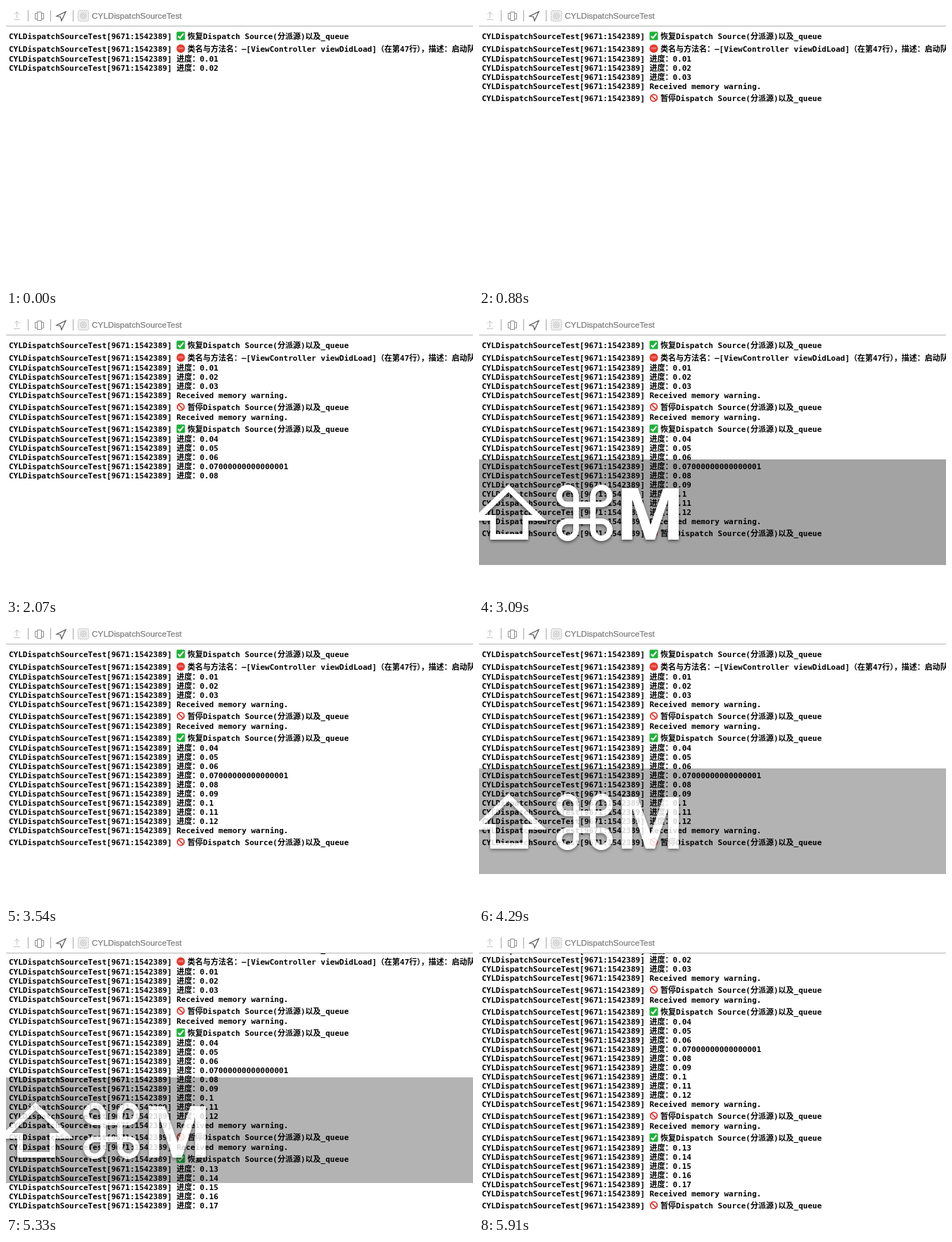
An HTML page for the animation above (7180 ms loop, 664x399 px).

```html
<!DOCTYPE html>
<html lang="zh-CN">
<head>
<meta charset="utf-8">
<style>
  html, body { margin: 0; width: 100%; height: 100%; overflow: hidden; background: #fff; }
  svg { display: block; }
  #log { font: bold 11px "DejaVu Sans Mono", "Noto Sans CJK SC", "Noto Sans CJK", monospace; }
  .title { font: 11.8px "Liberation Sans", sans-serif; fill: #7f7f7f; stroke: #7f7f7f; stroke-width: .25; }
  .keys { filter: drop-shadow(0 2px 2px rgba(0, 0, 0, .55)); }
</style>
</head>
<body>
<svg width="664" height="399" viewBox="0 0 664 399">
  <defs>
    <clipPath id="console"><rect y="29" width="664" height="370"/></clipPath>
    <g id="check">
      <rect x="-6" y="-6" width="12" height="12" rx="1.5" fill="#1fb13a"/>
      <path d="M-3.7 .4L-1.2 3L3.8-3.4" fill="none" stroke="#fff" stroke-width="2"/>
    </g>
    <g id="stop">
      <circle r="6" fill="#e5382d"/>
      <rect x="-4" y="-2" width="8" height="3" rx="1.5" fill="#fff" opacity=".3"/>
    </g>
    <g id="ban" fill="none" stroke="#dc3a30" stroke-width="1.8">
      <circle r="4.8"/>
      <path d="M-3.4-3.4L3.4 3.4"/>
    </g>
  </defs>

  <g clip-path="url(#console)"><g id="log"></g></g>

  <g fill="none">
    <path d="M0 28.5H664" stroke="#b4b4b4"/>
    <path d="M31.5 6V22M63.5 6V22M95.5 6V22" stroke="#a8a8a8"/>
    <path d="M15.5 17V8.5M12 12L15.5 8.5L19 12M11 19.5H20" stroke="#c4c4c4"/>
    <path d="M44.5 8.5H50.5V20.5H44.5ZM44 10.5H41.5V18.5H44M51 10.5H53.5V18.5H51" stroke="#8c8c8c"/>
    <path d="M85 8L72 14.5L77.5 15.5L79 21Z" stroke="#555" stroke-width="1.2"/>
    <rect x="102.5" y="6.5" width="15" height="15" rx="2" fill="#ececec" stroke="#c2c2c2" stroke-dasharray="2 1"/>
    <circle cx="110" cy="14" r="4" stroke="#c6c6c6"/>
    <circle cx="110" cy="14" r="1.5" stroke="#c6c6c6"/>
  </g>
  <text class="title" x="122" y="18">CYLDispatchSourceTest</text>

  <g id="overlay">
    <rect y="205" width="664" height="150" opacity=".36"/>
    <g class="keys">
      <path d="M42 246L86 288H66V315H20V288H-2Z" fill="none" stroke="#fff" stroke-width="8"/>
      <path transform="translate(102 233) scale(4)" fill="none" stroke="#fff" stroke-width="2"
        d="M15 6v12a3 3 0 1 0 3-3H6a3 3 0 1 0 3 3V6a3 3 0 1 0-3 3h12a3 3 0 1 0-3-3"/>
      <path d="M203 319V246H226L244 298L262 246H284V319H269V262L250 319H237L218 262V319Z" fill="#fff"/>
    </g>
  </g>
</svg>
<script>
const LOOP = 7180;
const LAST_ROW = 387;
const overlayStarts = [290, 1330, 2940, 4290, 5322];

const progress = (time, value) => ({ time, text: '进度：' + value });
const warning = time => ({ time, text: 'Received memory warning.' });
const pause = time => ({ time, icon: 'ban', text: '暂停Dispatch Source(分派源)以及_queue' });
const resume = time => ({ time, icon: 'check', text: '恢复Dispatch Source(分派源)以及_queue' });

const rows = [
  resume(0),
  { time: 0, icon: 'stop', text: '类名与方法名：–[ViewController viewDidLoad]（在第47行），描述：启动队列' },
  progress(0, 0.01), progress(0, 0.02), progress(150, 0.03),
  warning(440), pause(440),
  warning(1480), resume(1480),
  progress(1480, 0.04), progress(1480, 0.05), progress(1770, 0.06),
  progress(1920, '0.07000000000000001'), progress(2070, 0.08),
  progress(2360, 0.09), progress(2510, 0.1), progress(2810, 0.11), progress(2945, 0.12),
  warning(3088), pause(3088),
  warning(4440), resume(4440),
  progress(4440, 0.13), progress(4590, 0.14), progress(4880, 0.15),
  progress(5030, 0.16), progress(5180, 0.17),
  warning(5470), pause(5470)
];

const log = document.getElementById('log');
const overlay = document.getElementById('overlay');

function add(parent, tag, attributes, text = '') {
  const node = document.createElementNS('http://www.w3.org/2000/svg', tag);
  for (const key in attributes) node.setAttribute(key, attributes[key]);
  node.textContent = text;
  return parent.appendChild(node);
}

// Rows with an icon are taller than plain ones.
let y = 26;
rows.forEach((row, i) => {
  const afterIcon = i && rows[i - 1].icon;
  y += row.icon ? (afterIcon ? 18 : 17) : (afterIcon ? 14 : 13);
  row.y = y;
  row.node = add(log, 'g', { transform: `translate(0 ${y})` });
  add(row.node, 'text', { x: 4, y: 4 }, 'CYLDispatchSourceTest[9671:1542389]');
  add(row.node, 'text', { x: row.icon ? 258 : 242.5, y: 4 }, row.text);
  if (row.icon) add(row.node, 'use', { href: '#' + row.icon, x: 248.5, y: -.5 });
});

function overlayOpacity(time) {
  const start = overlayStarts.findLast(s => s <= time);
  const age = time - start;
  if (age < 145) return .83;
  if (age < 445) return 1;
  return age < 585 ? .5 : 0;
}

function draw() {
  const time = performance.now() % LOOP;
  let bottom = 0;
  for (const row of rows) {
    const shown = time >= row.time;
    row.node.setAttribute('visibility', shown ? 'visible' : 'hidden');
    if (shown) bottom = row.y;
  }
  log.setAttribute('transform', `translate(0 ${Math.min(0, LAST_ROW - bottom)})`);
  overlay.setAttribute('opacity', overlayOpacity(time));
  requestAnimationFrame(draw);
}
draw();
</script>
</body>
</html>
```
